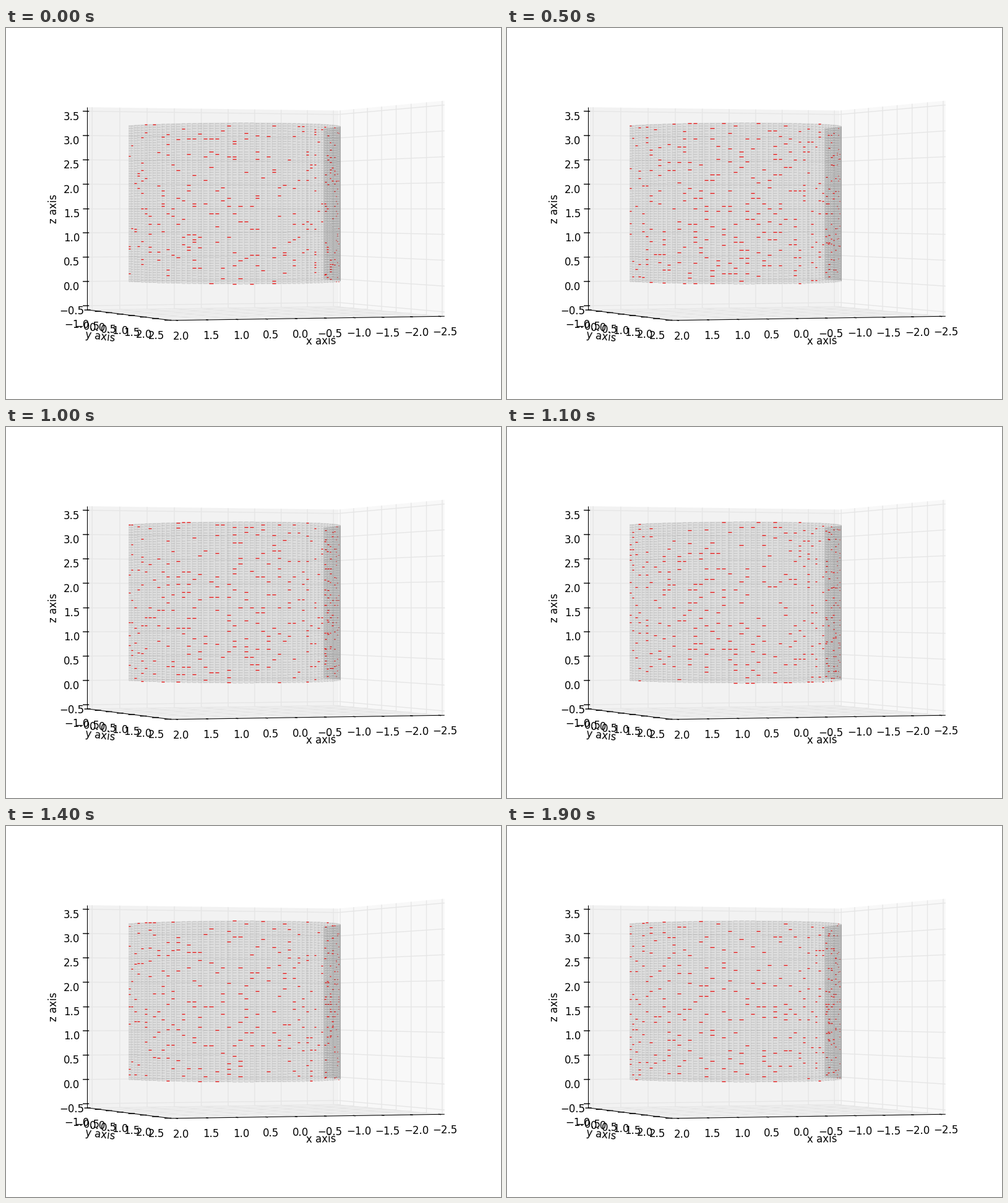
Recreate the animation shown at these times as a matplotlib script. Size 800 by 600 pixels, loop 2000 ms.

```python
import numpy as np
import matplotlib.pyplot as plt
from matplotlib.animation import FuncAnimation
from matplotlib.collections import LineCollection
from matplotlib.patches import Polygon

W, H, DPI = 800, 600, 100
FRAMES, INTERVAL = 20, 100
AZIM, DIST = np.radians(70), 10
LIMITS = np.array([(-2.5, 2.0), (-1.0, 2.5), (-0.5, 3.5)])
EDGE = 0.5 + 1 / 48          # panes reach a little past the data box
TICK_OUT, TICK_IN = 1 / 60, 1 / 120
TICK_PAD, LABEL_PAD = 12 / 252, 26 / 252

N = 63                       # cells around and up the sheet
RADIUS, THETA0, STEP = 1.855, 0.12, 0.0495
Z0, Z_STEP = 0.05, 0.05
DASH = 0.33                  # half length of a dash, in cells
LIMB = 52                    # columns from here on lie behind

plt.rcParams["font.family"] = "DejaVu Sans"
fig = plt.figure(figsize=(W / DPI, H / DPI), dpi=DPI, facecolor="white")
ax = fig.add_axes([0, 0, 1, 1])
ax.set_xlim(0, W)
ax.set_ylim(H, 0)
ax.axis("off")


def project(p):
    """Unit-box points, centred on zero, to stage pixels."""
    x, y, z = np.moveaxis(np.asarray(p, float), -1, 0)
    s, c = np.sin(AZIM), np.cos(AZIM)
    depth = DIST - (c * x + s * y)
    px = W / 0.185 * (0.095 + (c * y - s * x) / depth)
    py = H - H / 0.185 * (0.095 + z / depth)
    return np.stack([px, py], -1)


def unit(v, axis):
    lo, hi = LIMITS[axis]
    return (v - lo) / (hi - lo) - 0.5


def sheet(theta, z):
    theta, z = np.broadcast_arrays(theta, z)
    return project(np.stack([unit(RADIUS * np.cos(theta), 0),
                             unit(RADIUS * np.sin(theta), 1),
                             unit(z, 2)], -1))


def line(points, color="black", lw=1.0, z=3):
    xy = project(points)
    ax.plot(xy[:, 0], xy[:, 1], color=color, lw=lw, zorder=z,
            solid_capstyle="butt")


def label(point, text, va, rotation=0):
    x, y = project(point)
    ax.text(x, y, text, fontsize=12, ha="center", va=va,
            rotation=rotation, rotation_mode="anchor", zorder=4)


def slope(a, b):
    dx, dy = project(b) - project(a)
    return np.degrees(np.arctan2(-dy, dx))


def pane(points, shade):
    ax.add_patch(Polygon(project(points), facecolor=str(shade),
                         alpha=0.5, lw=0, zorder=1))


def draw_box():
    e = EDGE
    pane([(-e, -e, -e), (-e, e, -e), (-e, e, e), (-e, -e, e)], 0.95)
    pane([(-e, -e, -e), (e, -e, -e), (e, -e, e), (-e, -e, e)], 0.9)
    pane([(-e, -e, -e), (e, -e, -e), (e, e, -e), (-e, e, -e)], 0.925)

    out, inner, t = e + TICK_OUT, e - TICK_IN, e + TICK_PAD
    ticks = [np.arange(lo, hi + 0.1, 0.5) for lo, hi in LIMITS]
    for axis, values in enumerate(ticks):
        for v in values:
            u = unit(v, axis)
            if axis == 0:
                grid = [(u, e, -e), (u, -e, -e), (u, -e, e)]
                tick = [(u, out, -e), (u, inner, -e)]
                spot = (u, t, -t)
            elif axis == 1:
                grid = [(e, u, -e), (-e, u, -e), (-e, u, e)]
                tick = [(out, u, -e), (inner, u, -e)]
                spot = (t, u, -t)
            else:
                grid = [(e, -e, u), (-e, -e, u), (-e, e, u)]
                tick = [(out, -e, u), (inner, -e, u)]
                spot = (t, -t, u)
            line(grid, "0.9", z=2)
            line(tick)
            label(spot, f"{v:.1f}".replace("-", "\u2212"), "top")

    left, front, right = (e, -e, -e), (e, e, -e), (-e, e, -e)
    for a, b in ((left, front), (front, right), (left, (e, -e, e))):
        line([a, b], lw=0.75)
    m = e + LABEL_PAD
    label((0, m, -m), "x axis", "center", slope(front, right))
    label((m, 0, -m), "y axis", "center", slope(left, front))
    label((m, -m, 0), "z axis", "center", 90)


def make_dashes():
    """Horizontal strokes, indexed by column, row, end, xy."""
    theta = (THETA0 + STEP * np.arange(N))[:, None]
    z = (Z0 + Z_STEP * np.arange(N))[None, :]
    a = sheet(theta - DASH * STEP, z)
    b = sheet(theta + DASH * STEP, z)
    a[..., 1] = b[..., 1] = sheet(theta, z)[..., 1]
    return np.stack([a, b], 2)


def draw_layer(cols, z):
    low, high = Z0 - 0.005, Z0 + Z_STEP * (N - 1) + 0.005
    edges = THETA0 + STEP * (np.append(cols, cols[-1] + 1) - 0.3)
    bottom, top = sheet(edges, low), sheet(edges, high)
    ax.add_patch(Polygon(np.vstack([bottom, top[::-1]]), facecolor="black",
                         alpha=0.085, lw=0, zorder=z))
    ax.add_collection(LineCollection(np.stack([bottom, top], 1)[1:],
                                     colors=[(0, 0, 0, 0.06)],
                                     linewidths=0.7, zorder=z + 0.1))
    ax.add_collection(LineCollection(dashes[cols].reshape(-1, 2, 2),
                                     colors=[(0, 0, 0, 0.11)],
                                     linewidths=0.8, zorder=z + 0.2))
    red = LineCollection([], colors="#e81818", linewidths=1.0, zorder=z + 0.3)
    ax.add_collection(red)
    return red


def lit_cells(k):
    """Random cells; after the first step a lit cell blocks those above it."""
    rng = np.random.default_rng(40 + k)
    draw = rng.random((N, N))
    if k == 0:
        return draw < 0.075
    lit = draw < 0.115
    for row in range(1, N):
        below = np.pad(lit[:, row - 1], 1)
        lit[:, row] &= ~(below[:-2] | below[1:-1] | below[2:])
    return lit


draw_box()
dashes = make_dashes()
columns = np.arange(N)
back_cols, front_cols = columns[LIMB:], columns[:LIMB]
back_red = draw_layer(back_cols, 5)
front_red = draw_layer(front_cols, 6)


def update(k):
    lit = lit_cells(k)
    back_red.set_segments(dashes[back_cols][lit[back_cols]])
    front_red.set_segments(dashes[front_cols][lit[front_cols]])
    return back_red, front_red


def reset():
    return update(0)


anim = FuncAnimation(fig, update, frames=FRAMES, init_func=reset,
                     interval=INTERVAL, repeat=True, repeat_delay=0)
plt.show()
```
